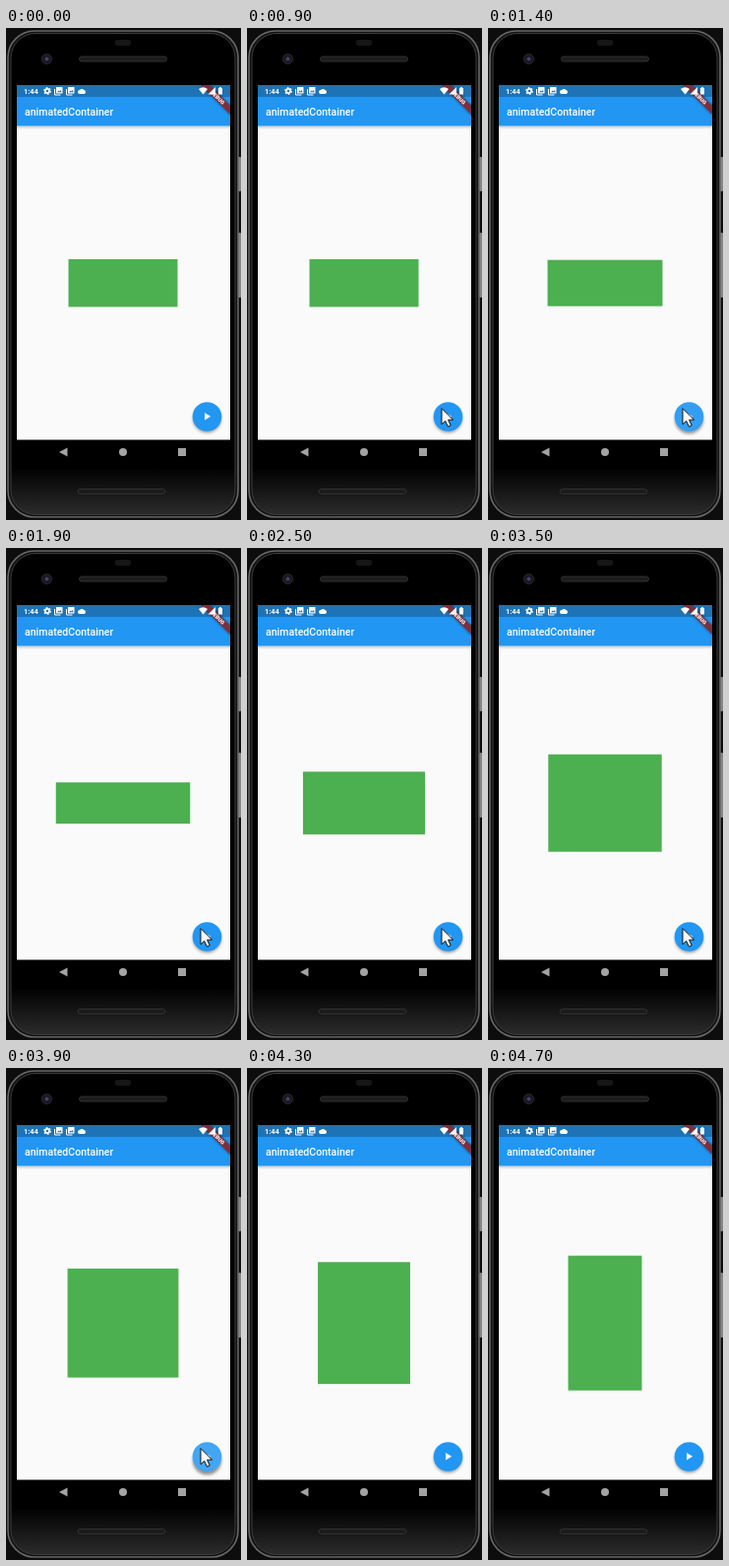
Write an HTML page that moves like this. It is 239 px wide and 500 px high and loops after 5.1 s.

```html
<!DOCTYPE html>
<html lang="en">
<head>
<meta charset="utf-8">
<title>animatedContainer</title>
<style>
  html, body { margin: 0; width: 100%; height: 100%; overflow: hidden; background: #000; }
  svg { display: block; width: 100%; height: 100%; font-family: Roboto, sans-serif; }
</style>
</head>
<body>
<svg viewBox="0 0 239 500">
  <defs>
    <clipPath id="screen"><rect x="11" y="58" width="217" height="360.5"/></clipPath>
    <filter id="soft" x="-50%" y="-50%" width="200%" height="200%"><feGaussianBlur stdDeviation="1.6"/></filter>
    <linearGradient id="barShadow" x2="0" y2="1">
      <stop stop-color="#000" stop-opacity=".2"/>
      <stop offset="1" stop-color="#000" stop-opacity="0"/>
    </linearGradient>
    <linearGradient id="body" x2="0" y2="1">
      <stop offset=".9" stop-color="#000"/>
      <stop offset="1" stop-color="#2b2b2b"/>
    </linearGradient>
    <g id="photos">
      <path d="M0 2V8H6" fill="none" stroke="#fff"/>
      <rect x="1.5" width="6.5" height="6.5" rx=".6" fill="#fff"/>
      <path d="M2.6 5.2 4 3.4 5 4.5 6 3 7.2 5.2Z" fill="#1d73b5"/>
    </g>
  </defs>

  <!-- phone body -->
  <rect width="239" height="500" fill="#0d0d0d"/>
  <g fill="#858585">
    <rect x="236" y="131" width="3" height="35" rx="1"/>
    <rect x="236" y="208" width="3" height="66" rx="1"/>
  </g>
  <rect x="2" y="3" width="234" height="494" rx="27" fill="#111" stroke="#686868" stroke-width="1.6"/>
  <rect x="5" y="5.5" width="228" height="489" rx="25" fill="url(#body)" stroke="#3c3c3c"/>
  <rect x="111" y="12" width="16" height="6" rx="2" fill="#161616"/>
  <g fill="#1c1c1c" stroke="#303030">
    <rect x="74.5" y="29" width="89" height="5" rx="2.5"/>
    <rect x="73" y="468.5" width="89" height="5" rx="2.5"/>
  </g>
  <circle cx="41.5" cy="31.5" r="5" fill="#18181d" stroke="#2b2b30"/>
  <circle cx="41.5" cy="31.5" r="2" fill="#433f75"/>

  <g clip-path="url(#screen)">
    <rect x="11" y="58" width="217" height="361" fill="#fafafa"/>
    <rect x="11" y="99.5" width="217" height="3.5" fill="url(#barShadow)"/>
    <rect x="11" y="58" width="217" height="41.5" fill="#2196f3"/>
    <rect x="11" y="58" width="217" height="12" fill="#1d73b5"/>
    <text x="19" y="89" font-size="10.56" font-weight="500" fill="#fff">animatedContainer</text>

    <rect id="box" fill="#4caf50"/>

    <g transform="translate(228 58) rotate(45)">
      <rect x="-21" y="14.8" width="42" height="6.3" opacity=".5" filter="url(#soft)"/>
      <rect x="-21" y="14.8" width="42" height="6.3" fill="#7d2f3c"/>
      <text y="19.9" font-size="5.4" font-weight="900" fill="#fff" text-anchor="middle">DEBUG</text>
    </g>

    <!-- status bar -->
    <text x="18" y="67" font-size="7.4" font-weight="700" fill="#fff">1:44</text>
    <circle cx="42" cy="64" r="2.1" fill="none" stroke="#fff" stroke-width="1.7"/>
    <circle cx="42" cy="64" r="3.3" fill="none" stroke="#fff" stroke-width="1.2" stroke-dasharray="1.73 1.73"/>
    <use href="#photos" x="49.5" y="60"/>
    <use href="#photos" x="61.5" y="60"/>
    <path d="M75 67A2 2 0 0 1 75 63A2.7 2.7 0 0 1 79.4 63.1A2 2 0 0 1 79.5 67Z" fill="#fff"/>
    <g fill="#fff">
      <path d="M196 62Q200.5 58.6 205 62L200.5 67.5Z"/>
      <path d="M213 60V67.5H205.5Z"/>
      <path d="M216 61H217V60H219V61H220V67.5H216Z"/>
    </g>

    <!-- action button -->
    <circle id="shadow" cx="204.5" r="14.6" filter="url(#soft)"/>
    <circle cx="204.5" cy="395" r="14.8" fill="#2196f3"/>
    <circle id="splash" cx="204.5" cy="395" r="14.8" fill="#fff"/>
    <path d="M202 391V398.6L208.2 394.8Z" fill="#fff"/>
  </g>

  <g fill="#a3a3a3">
    <path d="M62.5 426.5V435.5L54 431Z"/>
    <circle cx="119" cy="431" r="4"/>
    <rect x="175" y="427" width="8" height="8"/>
  </g>

  <path id="cursor" d="M0 0V16.2L3.7 12.7 6.4 18.6 9.2 17.3 6.6 11.6H11.6Z"
        fill="#fff" stroke="#111" stroke-linejoin="round"/>
</svg>
<script>
const LOOP = 5100, STEP = 100;
const CENTER = { x: 119, y: 259.2 };
// time, width, height
const sizes = [
  [1250, 111, 48.5], [2000, 140.4, 41], [2900, 111, 82],
  [3800, 117.6, 107.5], [4700, 75, 137]
];
// time, x, y
const pointer = [[300, 66, 360], [500, 142, 374], [800, 195.5, 384.5], [900, 198, 386.6]];
const presses = [1200, 2000, 2900, 3800];
const $ = id => document.getElementById(id);

function set(id, attrs) {
  for (const name in attrs) $(id).setAttribute(name, attrs[name]);
}

function sample(keys, t) {
  if (t <= keys[0][0]) return keys[0].slice(1);
  const i = keys.findIndex(key => key[0] >= t);
  if (i < 0) return keys[keys.length - 1].slice(1);
  const [a, b] = [keys[i - 1], keys[i]];
  const k = (t - a[0]) / (b[0] - a[0]);
  return a.slice(1).map((v, j) => v + (b[j + 1] - v) * k);
}

function draw(time) {
  const t = Math.floor(time % LOOP / STEP) * STEP;
  const [width, height] = sample(sizes, t);
  set("box", { x: CENTER.x - width / 2, y: CENTER.y - height / 2, width, height });

  const [x, y] = sample(pointer, t);
  set("cursor", {
    transform: `translate(${x} ${y})`,
    visibility: t >= 300 && t < 4200 ? "visible" : "hidden"
  });

  // each press raises the button briefly
  const lift = Math.max(0, ...presses.map(p => 1 - Math.abs(t - p - 100) / 200));
  set("shadow", { cy: 397 + 2 * lift, opacity: 0.35 + 0.06 * lift });
  set("splash", { opacity: 0.15 * lift });
}

const start = performance.now();
function tick() {
  draw(performance.now() - start);
  requestAnimationFrame(tick);
}
draw(0);
requestAnimationFrame(tick);
</script>
</body>
</html>
```
